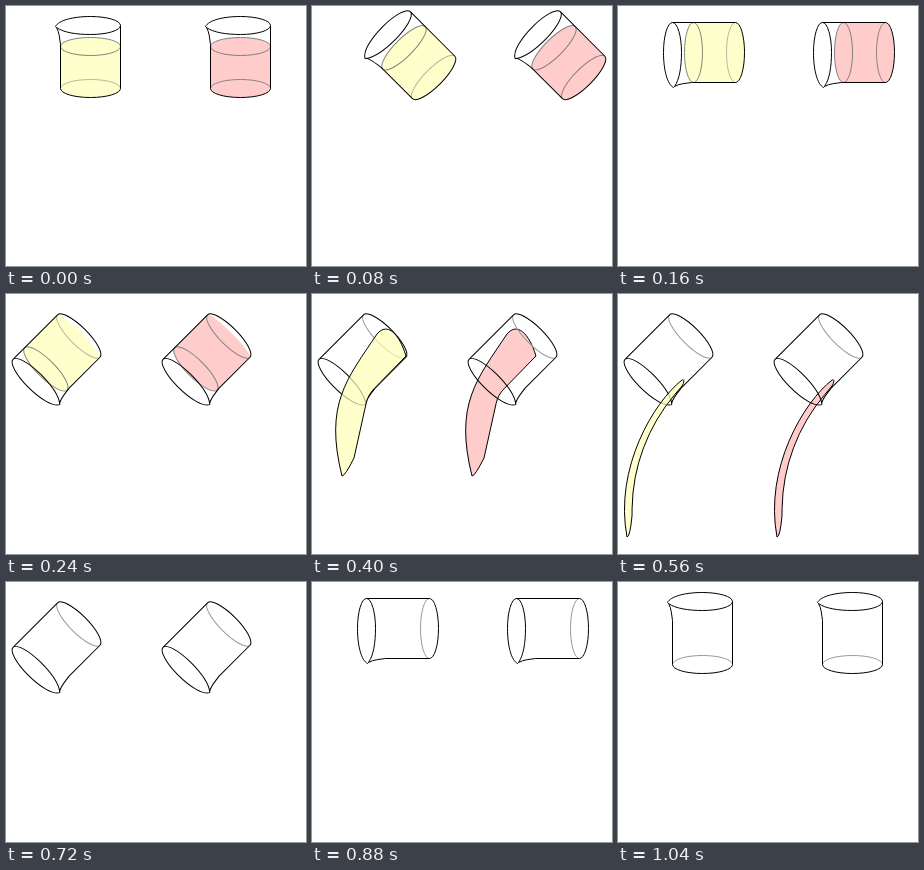
An HTML page with a canvas that plays this animation: 300 px wide and 260 px high, repeating every 1680 ms.

```html
<!DOCTYPE html>
<html>
<head>
<meta charset="utf-8">
<title>Pouring beakers</title>
<style>
html, body { margin: 0; width: 300px; height: 260px; overflow: hidden; background: #fff; }
canvas { display: block; }
</style>
</head>
<body>
<canvas id="stage" width="300" height="260"></canvas>
<script>
const ctx = document.getElementById('stage').getContext('2d');
const LOOP = 1680, STEP = 80, GAP = 150;
const TAU = Math.PI * 2;
const R = 30, RY = 9, TOP = -31.5, BASE = 31.5;

// Beaker centre for each 45 degrees of tilt
const centres = [[84.5, 51], [99.4, 49.2], [86, 46.5], [50.5, 64.3]];

// Key shapes of the poured liquid, from a full flow to a thin one
const flow = {
  head: [65, 40], left: [35, 85], bulge: [12, 110], tail: [30, 182], hip: [42, 164],
  lip: [56, 101], corner: [94, 62], crown: [87, 39], brow: [75, 28], bend: [30]
};
const trickle = {
  head: [64, 86], left: [36, 108], bulge: [-4, 174], tail: [9, 243], hip: [14, 222],
  lip: [15, 150], corner: [64, 92], crown: [67, 87], brow: [66, 85], bend: [180]
};

// thin: 0 = flow, 1 = trickle; drop: lower part moved down; size: scale about the tail
const pours = [
  { thin: -0.1, drop: -40, size: 1 },
  { thin: 0, drop: 0, size: 1 },
  { thin: 0.5, drop: 46, size: 1 },
  { thin: 1, drop: 0, size: 1 },
  { thin: 1, drop: 0, size: 0.6 }
];

const yellow = { fill: '#ffffcc', surface: '#84847a', back: '#b8b89c' };
const pink = { fill: '#ffcccc', surface: '#808080', back: '#8c8484' };
const glaze = 'rgba(255,255,182,0.7)';

function line(color, path) {
  ctx.beginPath();
  path();
  ctx.strokeStyle = color;
  ctx.stroke();
}

function arc(y, from, to, ry = RY) {
  ctx.ellipse(0, y, R, ry, 0, from, to);
}

function beaker(tip, full, dx, look) {
  const upturned = tip === 3;
  const level = TOP + (upturned ? 16.5 : 21);
  ctx.save();
  ctx.translate(centres[tip][0] + dx, centres[tip][1]);
  ctx.rotate(-tip * Math.PI / 4);
  if (full) {
    ctx.beginPath();
    arc(level, Math.PI, TAU);
    arc(BASE, 0, Math.PI, upturned ? 4 : RY);
    ctx.closePath();
    ctx.fillStyle = look.fill;
    ctx.fill();
    line(look.surface, () => arc(level, 0, TAU));
  }
  line(full ? look.back : '#999', () => arc(BASE, Math.PI, TAU));
  line('#000', () => {
    // rim with spout
    ctx.moveTo(-35, TOP + 1);
    ctx.bezierCurveTo(-32, TOP - 5, -18, TOP - RY, 0, TOP - RY);
    arc(TOP, -Math.PI / 2, Math.PI / 2);
    ctx.bezierCurveTo(-14, TOP + RY, -27, TOP + 7, -34, TOP + 2);
    ctx.closePath();
    // walls and base
    ctx.moveTo(-34, TOP + 2);
    ctx.bezierCurveTo(-31, TOP + 7, -31, TOP + 13, -R, TOP + 19);
    ctx.lineTo(-R, BASE);
    ctx.moveTo(R, TOP);
    ctx.lineTo(R, BASE);
    arc(BASE, 0, Math.PI);
  });
  ctx.restore();
}

function pourShape({ thin, drop, size }) {
  const p = {};
  for (const key in flow) {
    p[key] = flow[key].map((v, i) => v + (trickle[key][i] - v) * thin);
  }
  for (const key of ['bulge', 'tail', 'hip']) p[key][1] += drop;
  const [tx, ty] = p.tail;
  for (const key in p) {
    const [x, y] = p[key];
    p[key] = key === 'bend' ? x * size : [tx + (x - tx) * size, ty + (y - ty) * size];
  }
  return p;
}

function stream(p, dx, fill) {
  const [tx, ty] = p.tail;
  ctx.save();
  ctx.translate(dx, 0);
  ctx.beginPath();
  ctx.moveTo(...p.head);
  ctx.bezierCurveTo(...p.left, ...p.bulge, tx, ty);
  ctx.quadraticCurveTo(tx + 3, ty, ...p.hip);
  ctx.arcTo(...p.lip, ...p.corner, p.bend);
  ctx.lineTo(...p.corner);
  ctx.bezierCurveTo(...p.crown, ...p.brow, ...p.head);
  ctx.closePath();
  ctx.fillStyle = fill;
  ctx.fill();
  ctx.strokeStyle = '#000';
  ctx.stroke();
  ctx.restore();
}

function draw(t) {
  const step = Math.floor(t / STEP);
  const tip = Math.min(step, 3, Math.max(0, 13 - step));
  const full = step < 4;
  const pour = pours[step - 4];
  ctx.fillStyle = '#fff';
  ctx.fillRect(0, 0, 300, 260);
  beaker(tip, full, 0, yellow);
  // the yellow liquid lies over its glass, the pink one behind
  if (pour) {
    const shape = pourShape(pour);
    stream(shape, 0, glaze);
    stream(shape, GAP - 20 * (1 - pour.thin), pink.fill);
  }
  beaker(tip, full, GAP, pink);
}

const t0 = performance.now();
function tick() {
  draw((performance.now() - t0) % LOOP);
  requestAnimationFrame(tick);
}
tick();
</script>
</body>
</html>
```
